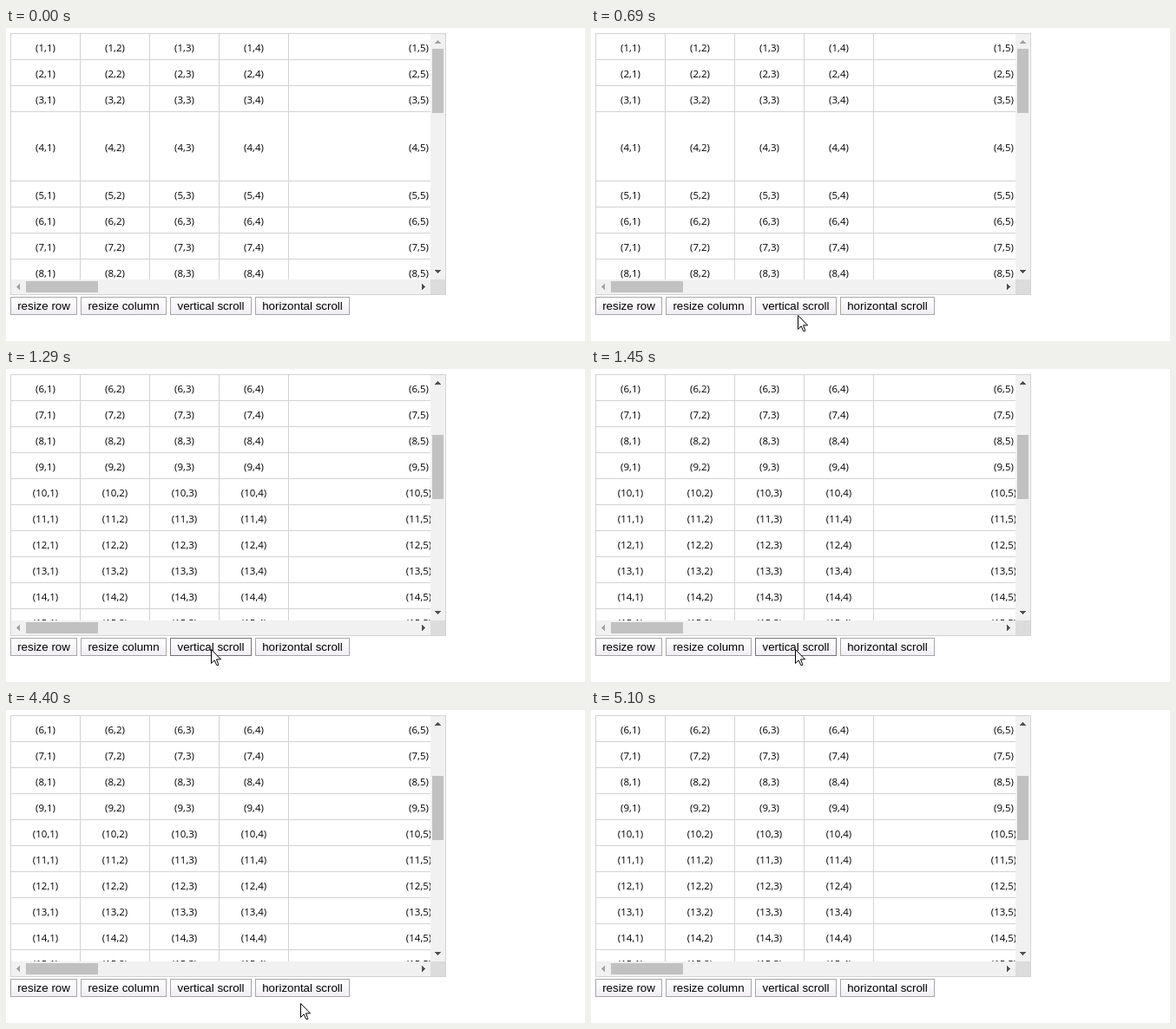
An HTML page with a canvas for the animation above (6.26 s loop, 667 by 361 pixels).

```html
<!DOCTYPE html>
<html lang="en">
<head>
<meta charset="utf-8">
<title>Grid scroll</title>
<style>
html, body { margin: 0; width: 100%; height: 100%; overflow: hidden; background: #fff; }
canvas { display: block; }
</style>
</head>
<body>
<canvas id="stage" width="667" height="361"></canvas>
<script>
const ctx = document.getElementById('stage').getContext('2d');
const LOOP = 6260;
const LINE = '#d3d3d3';
const ARROW_ON = '#505050', ARROW_OFF = '#a3a3a3';
const VIEW = { x: 6, y: 7, w: 483, h: 283 };
const COLS = [80, 80, 80, 80, 300];
const BUTTONS = [
  ['resize row', 5, 77],
  ['resize column', 86, 99],
  ['vertical scroll', 189, 94],
  ['horizontal scroll', 287, 109]
];

function rect(x, y, w, h, color) {
  ctx.fillStyle = color;
  ctx.fillRect(x, y, w, h);
}

function frame(x, y, w, h, color) {
  ctx.strokeStyle = color;
  ctx.lineWidth = 1;
  ctx.strokeRect(x + 0.5, y + 0.5, w - 1, h - 1);
}

function label(text, x, y, font) {
  ctx.font = font;
  ctx.textAlign = 'center';
  ctx.fillStyle = '#000';
  ctx.fillText(text, x, y);
}

function drawCells(scroll) {
  ctx.save();
  ctx.beginPath();
  ctx.rect(VIEW.x, VIEW.y, VIEW.w, VIEW.h);
  ctx.clip();
  let y = VIEW.y - scroll;
  for (let row = 1; y < VIEW.y + VIEW.h; row++) {
    const h = row === 4 ? 80 : 30;
    let x = VIEW.x;
    COLS.forEach((w, i) => {
      label(`(${row},${i + 1})`, x + (w - 1) / 2, y + (h - 1) / 2 + 5.5,
        '11.5px "Open Sans", "Noto Sans", sans-serif');
      x += w;
      rect(x - 1, y, 1, h, LINE);
    });
    y += h;
    rect(VIEW.x, y - 1, VIEW.w, 1, LINE);
  }
  ctx.restore();
}

// Four-step pixel triangle, pointing along (dx, dy) from its tip
function arrow(x, y, dx, dy, color) {
  for (let i = 0; i < 4; i++) {
    const size = 1 + 2 * i;
    if (dy) rect(x - i, y - dy * i, size, 1, color);
    else rect(x - dx * i, y - i, 1, size, color);
  }
}

function drawScrollbars(scroll) {
  rect(489, 7, 17, 283, '#f1f1f1');
  rect(6, 290, 483, 17, '#f1f1f1');
  rect(489, 290, 17, 17, '#dcdcdc');
  rect(491, 24 + scroll * 0.26, 13, 74, '#c1c1c1');
  rect(23, 292, 83, 13, '#c1c1c1');
  arrow(497, 14, 0, -1, scroll ? ARROW_ON : ARROW_OFF);
  arrow(497, 282, 0, 1, ARROW_ON);
  arrow(12, 298, -1, 0, ARROW_OFF);
  arrow(482, 298, 1, 0, ARROW_ON);
}

function drawButtons(hovered) {
  const fill = ctx.createLinearGradient(0, 311, 0, 330);
  fill.addColorStop(0, '#fff');
  fill.addColorStop(1, '#f1eef4');
  BUTTONS.forEach(([text, x, w], i) => {
    rect(x, 310, w, 21, fill);
    frame(x, 310, w, 21, hovered === i ? '#747474' : '#a6a6a6');
    label(text, x + w / 2, 325, '13.333px "Liberation Sans", Arial, sans-serif');
  });
}

function drawCursor([x, y]) {
  ctx.save();
  ctx.translate(x + 0.5, y + 0.5);
  const shape = new Path2D('M0 0V16L3.7 12.4L6.2 18H8.2V17L6 11.4H11Z');
  ctx.fillStyle = '#fff';
  ctx.fill(shape);
  ctx.strokeStyle = '#000';
  ctx.lineWidth = 1;
  ctx.stroke(shape);
  ctx.restore();
}

function drawClick(x, y) {
  ctx.fillStyle = 'rgba(255, 255, 0, 0.55)';
  ctx.beginPath();
  ctx.arc(x, y, 12, 0, 2 * Math.PI);
  ctx.fill();
}

// Mouse position, sampled about every 76 ms; null while off stage
function cursorAt(t) {
  const step = (start, gap) => Math.floor((t - start) / gap + 0.1);
  if (t < 150 || t >= 5100) return null;
  if (t < 840) {
    const left = 1 - Math.min(step(150, 76.25) / 8, 1);
    return [237 + 194 * left ** 2.5, 329 + 23 * left ** 1.2];
  }
  if (t < 920) return [237, 327];
  if (t < 1000) return [236, 325];
  if (t < 1150) return [236, 324];
  if (t < 1450) return [236, 323];
  if (t < 4170) return [235, 323];
  if (t < 4800) {
    const u = Math.min(step(4170, 75.7) / 7, 1);
    return [247 + 233 * u * u * (3 - 2 * u), 328 + 8 * u + 7 * Math.sin(Math.PI * u)];
  }
  const e = Math.min((step(4800, 75) + 1) / 4, 1) ** 1.3;
  return [480 + 128 * e, 336 + 20 * e];
}

function draw(t) {
  const scroll = t >= 1290 ? 200 : 0;
  const pos = cursorAt(t);
  rect(0, 0, 667, 361, '#fff');
  drawCells(scroll);
  drawScrollbars(scroll);
  frame(5, 6, 502, 302, LINE);
  drawButtons(t >= 760 && t < 4240 ? 2 : -1);
  if (t >= 1150 && t < 1290) drawClick(236, 323);
  if (pos) drawCursor(pos.map(Math.round));
}

const begin = performance.now();
function tick() {
  draw((performance.now() - begin) % LOOP);
  requestAnimationFrame(tick);
}
tick();
</script>
</body>
</html>
```
